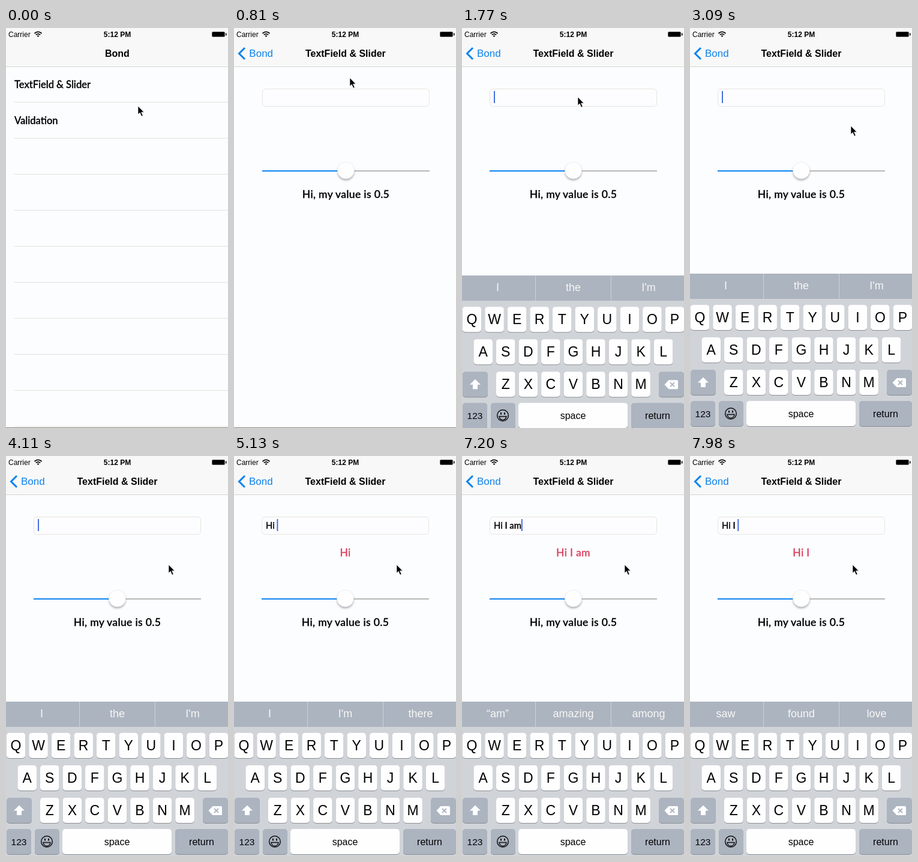
An HTML page that plays this animation: 370x666 px, repeating every 8000 ms.

```html
<!DOCTYPE html>
<html lang="en">
<head>
<meta charset="utf-8">
<style>
  html, body { margin: 0; width: 100%; height: 100%; overflow: hidden; background: #fcfdff; }
  svg { display: block; width: 100%; height: 100%; }
  text { font-family: "Liberation Sans", Arial, sans-serif; white-space: pre; }
  .geo { font-family: Lato, sans-serif; font-weight: 500; stroke: #000; stroke-width: .35px; }
  .bold { font-weight: 700; font-size: 16px; }
  .mid { text-anchor: middle; }
  .label { font-size: 17.6px; letter-spacing: .3px; }
  .hint { font-size: 18px; fill: #f8f8f4; }
  #echo { fill: #dd4562; stroke: #dd4562; }
</style>
</head>
<body>
<svg viewBox="0 0 370 666">
  <defs>
    <filter id="soft" x="-50%" y="-50%" width="200%" height="200%">
      <feDropShadow dx="0" dy="2.5" stdDeviation="1.6" flood-color="#404048" flood-opacity=".4"/>
    </filter>
  </defs>
  <rect width="370" height="666" fill="#fcfdff"/>
  <g id="list">
    <rect id="press" y="64" width="370" height="60" fill="#d9d9da"/>
    <g id="lines" stroke="#e2e2da"></g>
    <text class="geo" x="14" y="100" font-size="16.5">TextField &amp; Slider</text>
    <text class="geo" x="14" y="160" font-size="16.5">Validation</text>
  </g>
  <g id="page">
    <rect x="-1" width="371" height="666" fill="#fcfdff"/>
    <rect x="46.5" y="101.5" width="278" height="29" rx="5" fill="#fdfdff" stroke="#e6e5de"/>
    <text id="typed" class="geo" x="53" y="121" font-size="14.7"></text>
    <rect id="caret" y="105" width="2" height="20" fill="#4570e0"/>
    <text id="echo" class="geo label mid" x="185.5" y="167"></text>
    <rect x="46" y="237" width="139" height="2" fill="#0d84ee"/>
    <rect x="185" y="237" width="140" height="2" fill="#b8b7b6"/>
    <circle cx="185.5" cy="237" r="14" fill="#fefefe" stroke="#e0e0de" stroke-width=".5" filter="url(#soft)"/>
    <text class="geo label mid" x="185.5" y="283">Hi, my value is 0.5</text>
  </g>
  <rect y="665" width="370" height="1" fill="#85857a"/>
  <rect width="370" height="64" fill="#f8f8f8"/>
  <rect y="64" width="370" height="1" fill="#d4d4ce"/>
  <text x="4" y="14.5" font-size="12">Carrier</text>
  <g fill="none" stroke="#000" stroke-width="1.7">
    <path d="M47.5 9q6-5.4 12 0M49.8 11.4q3.7-3.2 7.4 0"/>
    <path d="M53.5 15l-2-2.1q2-1.5 4 0z" fill="#000" stroke="none"/>
  </g>
  <text class="mid" x="185.5" y="14.5" font-weight="700" font-size="12">5:12 PM</text>
  <rect x="343.5" y="6.5" width="21" height="8" rx="1.5" stroke="#555"/>
  <rect x="366" y="8.5" width="1.5" height="4"/>
  <path id="chevron" d="M18 33l-9.5 9.5 9.5 9.5" fill="none" stroke="#0d82ee" stroke-width="3"/>
  <text id="home" class="bold" y="48">Bond</text>
  <text id="back" y="48" font-size="17" fill="#0d82ee">Bond</text>
  <text id="title" class="bold mid" y="48">TextField &amp; Slider</text>
  <g id="board">
    <rect y="409" width="370" height="257" fill="#d0d4d9"/>
    <rect y="409" width="370" height="42" fill="#acb4c0"/>
    <path d="M122.5 409v42M248.5 409v42" stroke="#ced2d6"/>
    <g id="old"></g>
    <g id="fresh"></g>
    <g id="keys"></g>
    <path d="M22 581.5l9 9h-5v7.5h-8v-7.5h-5z" fill="#fff"/>
    <path d="M337.5 590.5l7-7.5h14q1.5 0 1.5 1.5v12q0 1.5-1.5 1.5h-14z" fill="#fff"/>
    <path d="M347 587l7 7m0-7l-7 7" stroke="#acb4c0" stroke-width="1.8"/>
    <g fill="none" stroke="#111" stroke-width="1.5">
      <circle cx="68" cy="642" r="9.3"/>
      <path d="M62 643.5h12q-1 6-6 6t-6-6z"/>
      <path d="M65 637v3.5M71 637v3.5" stroke-width="2"/>
    </g>
  </g>
  <path id="mouse" d="M0 0v14l3.2-3 2.6 6 2.4-1-2.6-5.8h4.4z" stroke="#fff" stroke-width=".7"/>
</svg>
<script>
const $ = id => document.getElementById(id);
const LOOP = 8000, PUSH = 440, RISE = 1415, FADE = 250;

// time, field text, keyboard suggestions
const typing = [
  [0, "", "I", "the", "I'm"],
  [4250, "H", "“H”", "He", "Hey"],
  [4480, "Hi", "“Hi”", "His", "Him"],
  [4750, "Hi ", "I", "I'm", "there"],
  [5400, "Hi I", "“I”", "I'm", "I'll"],
  [5650, "Hi I ", "am", "have", "love"],
  [5860, "Hi I a", "“a”", "am", "and"],
  [6080, "Hi I am", "“am”", "amazing", "among"],
  [7250, "Hi I a", "“a”", "am", "and"],
  [7600, "Hi I ", "saw", "found", "love"]
];

// time, x, y of the pointer
const trail = [
  [0, 220, 130], [270, 193, 83], [930, 193, 83], [1230, 193, 115],
  [2300, 193, 115], [3000, 268, 163], [3120, 268, 163], [3450, 271, 181], [LOOP, 271, 181]
];

const clamp = v => Math.max(0, Math.min(1, v));
const mix = (a, b, p) => a + (b - a) * p;
const move = (id, x, y) => $(id).setAttribute("transform", `translate(${x} ${y})`);
const show = (id, alpha) => $(id).setAttribute("opacity", alpha);

// Share of the way still to go for a critically damped spring
function remaining(ms, rate) {
  const k = Math.max(0, ms) / 1000 * rate;
  return (1 + k) * Math.exp(-k);
}

function key(x, y, w, label, size, fill = "#fefefe") {
  return `<rect x="${x}" y="${y + 1}" width="${w}" height="42" rx="5" fill="#8b8e92"/>
    <rect x="${x}" y="${y}" width="${w}" height="42" rx="5" fill="${fill}"/>
    <text class="mid" x="${x + w / 2}" y="${y + 21 + size * .36}" font-size="${size}">${label}</text>`;
}

function buildKeys() {
  const gray = "#acb4c0";
  let out = "";
  [["QWERTYUIOP", .7, 461], ["ASDFGHJKL", 19.4, 515], ["ZXCVBNM", 57, 569]].forEach(([row, x, y]) =>
    [...row].forEach((c, i) => out += key(x + i * 37.55, y, 31.6, c, 23)));
  return out + key(1, 569, 42, "", 16, gray) + key(328, 569, 42, "", 16, gray)
    + key(1, 621, 41, "123", 15.5, gray) + key(48, 621, 41, "", 16, gray)
    + key(94, 621, 182, "space", 16) + key(282, 621, 88, "return", 16, gray);
}

function setHints(id, words) {
  const text = words.join("|");
  if ($(id).dataset.words === text) return;
  $(id).dataset.words = text;
  $(id).innerHTML = words.map((w, i) =>
    `<text class="hint mid" x="${[59.5, 185.5, 311][i]}" y="435">${w}</text>`).join("");
}

function drawTyping(t) {
  const n = typing.findLastIndex(s => s[0] <= t);
  const [start, text, ...words] = typing[n];
  const p = n ? clamp((t - start) / FADE) : 1;
  setHints("fresh", words);
  setHints("old", typing[Math.max(0, n - 1)].slice(2));
  show("fresh", p);
  show("old", 1 - p);
  $("typed").textContent = text;
  $("echo").textContent = text.trim();
  const width = text ? $("typed").getComputedTextLength() : 0;
  $("caret").setAttribute("x", 53 + width);
  const blink = (t - 1650 + 1000) % 1000 < 600;
  show("caret", t > RISE && (n || blink) ? 1 : 0);
}

function drawPush(t) {
  const r = remaining(t - PUSH, 22), p = 1 - r;
  move("list", -111 * p, 0);
  move("page", 370 * r, 0);
  show("page", t > PUSH ? 1 : 0);
  show("press", t > 425 ? 1 : 0);
  const x = mix(25, 165, r);
  $("home").setAttribute("x", x);
  $("back").setAttribute("x", x);
  $("title").setAttribute("x", mix(185.5, 330, r));
  show("home", clamp(1 - p * 1.6));
  for (const id of ["back", "title", "chevron"]) show(id, clamp(p * 1.6 - .6));
}

function drawPointer(t) {
  const i = Math.max(1, trail.findIndex(k => k[0] > t));
  const [t0, x0, y0] = trail[i - 1], [t1, x1, y1] = trail[i];
  const u = (t - t0) / (t1 - t0), p = u * u * (3 - 2 * u);
  move("mouse", mix(x0, x1, p), mix(y0, y1, p));
}

function frame(now) {
  const t = now % LOOP;
  drawPush(t);
  drawTyping(t);
  move("board", 0, 257 * remaining(t - RISE, 18));
  drawPointer(t);
  requestAnimationFrame(frame);
}

$("keys").innerHTML = buildKeys();
for (let y = 123.5; y < 666; y += 60) $("lines").innerHTML += `<path d="M14 ${y}h356"/>`;
requestAnimationFrame(frame);
</script>
</body>
</html>
```
